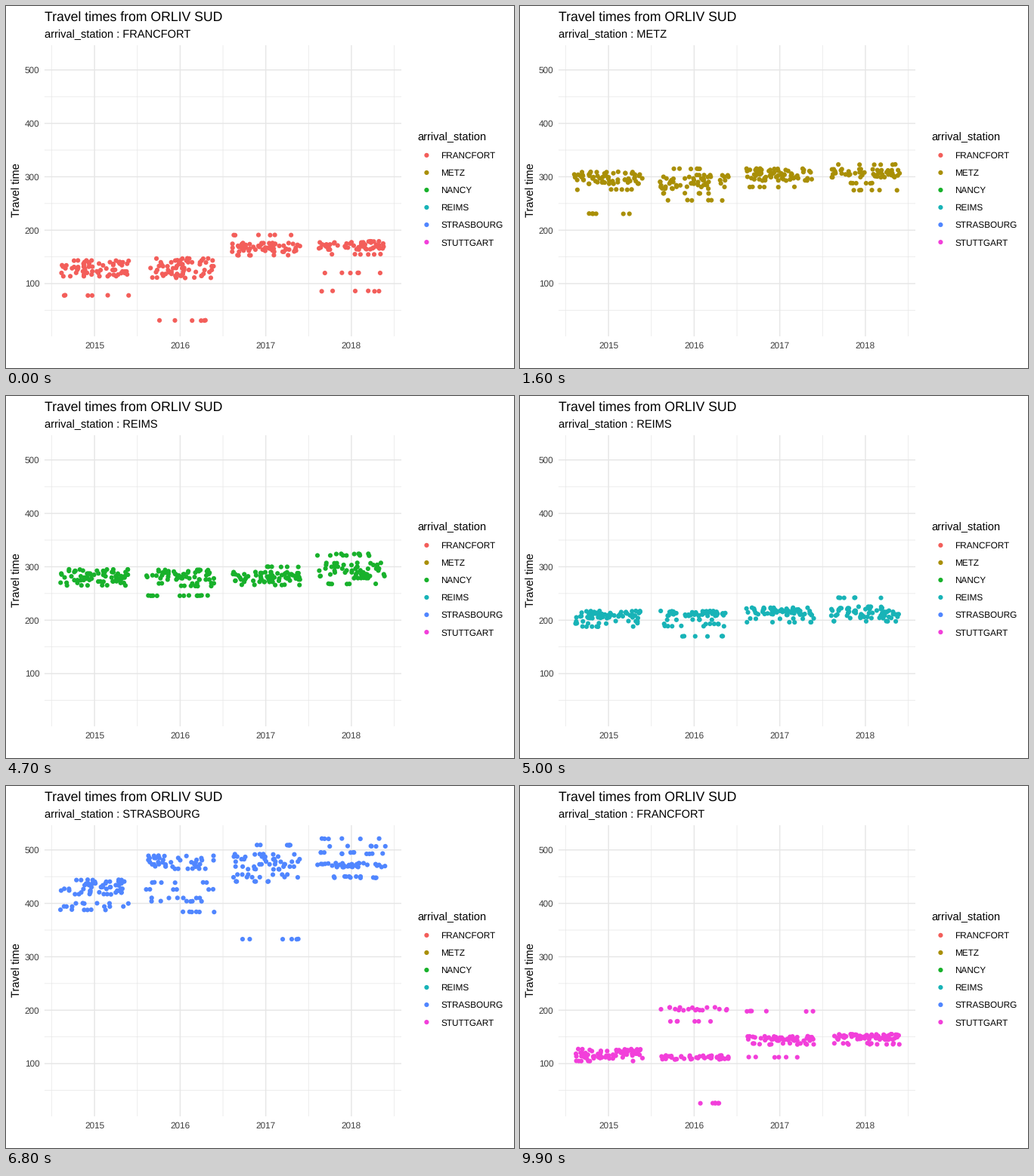
A matplotlib script that plays this animation: 672x480 px, repeating every 10000 ms.

```python
import numpy as np
import matplotlib
import matplotlib.pyplot as plt
from matplotlib.animation import FuncAnimation

matplotlib.rcParams["font.family"] = "Liberation Sans"
matplotlib.rcParams["text.hinting"] = "none"

WIDTH, HEIGHT, DPI = 672, 480, 96
LEFT, RIGHT, TOP, BOTTOM = 50.9, 523, 52, 438
GRID, TICK = "#E6E6E6", "#404040"
DOT_AREA = 21.3
MONTHS, REPEATS = 12, 6  # each monthly value appears as jittered copies
FRAMES = 100
STARTS = [0, 16, 33, 50, 67, 84]
TITLE_LEAD = 3  # the subtitle switches before the points do

rng = np.random.default_rng(15)


def year_x(year):
    return 117.1 + (year - 2015) * 113.27


def value_y(value):
    return 368.1 - (value - 100) * 0.7083


def jittered_years(*years):
    """Each year is (band low, band high, values outside the band...)."""
    clouds = []
    for year, (low, high, *strays) in enumerate(years, 2015):
        band = np.linspace(low, high, MONTHS - len(strays))
        values = np.repeat(np.append(band, strays), REPEATS)
        xs = year_x(year + rng.uniform(-0.4, 0.4, len(values)))
        ys = value_y(values + rng.uniform(-0.4, 0.4, len(values)))
        clouds.append(np.column_stack([xs, ys]))
    return np.vstack(clouds)


stations = [
    ("FRANCFORT", "#F35E5A", jittered_years(
        (114, 143, 78), (111, 147, 31),
        (160, 176, 191, 153), (164, 179, 155, 120, 86))),
    ("METZ", "#A98F06", jittered_years(
        (287, 309, 276, 231), (278, 303, 315, 269, 256),
        (293, 315, 281), (299, 314, 323, 288, 275))),
    ("NANCY", "#18B12B", jittered_years(
        (270, 295, 265), (276, 294, 269, 264, 246, 246),
        (272, 290, 300, 266), (279, 307, 324, 321, 268))),
    ("REIMS", "#18B3B7", jittered_years(
        (204, 217, 198, 194, 188), (208, 217, 201, 193, 189, 170),
        (210, 223, 203, 196), (204, 225, 242, 198))),
    ("STRASBOURG", "#5086FF", jittered_years(
        (417, 444, 400, 394, 388), (465, 489, 439, 426, 410, 404, 384),
        (464, 492, 509, 454, 449, 441, 333),
        (468, 475, 521, 507, 495, 493, 450, 448))),
    ("STUTTGART", "#F23FDA", jittered_years(
        (110, 127, 105), (108, 115, 205, 202, 200, 179, 26),
        (143, 151, 198, 138, 136, 112), (145, 155, 138, 136))),
]

fig = plt.figure(figsize=(WIDTH / DPI, HEIGHT / DPI), dpi=DPI, facecolor="white")
ax = fig.add_axes([0, 0, 1, 1])
ax.set_xlim(0, WIDTH)
ax.set_ylim(HEIGHT, 0)
ax.axis("off")


def label(x, y, text, size=11, color="black", **style):
    return ax.text(x, y, text, fontsize=size, color=color, va="baseline", **style)


def dot_cloud(points, colors):
    # One size per dot keeps the centres at fractions of a pixel.
    return ax.scatter(*np.transpose(points), s=np.full(len(points), DOT_AREA),
                      c=colors, linewidths=0, snap=False, zorder=3)


def grid_line(xs, ys, width):
    ax.plot(xs, ys, color=GRID, lw=width, snap=False,
            solid_capstyle="butt", zorder=1)


def vertical(year, width):
    grid_line([year_x(year)] * 2, [TOP, BOTTOM], width)


def horizontal(value, width):
    grid_line([LEFT, RIGHT], [value_y(value)] * 2, width)


for year in np.arange(2014.5, 2019):
    vertical(year, 0.53)
for value in range(50, 500, 100):
    horizontal(value, 0.53)
for year in range(2015, 2019):
    vertical(year, 1.07)
    label(year_x(year), 453.4, str(year), 8.8, TICK, ha="center")
for value in range(100, 600, 100):
    horizontal(value, 1.07)
    label(44.3, value_y(value) + 4.2, str(value), 8.8, TICK, ha="right")

label(LEFT, 20, "Travel times from ORLIV SUD", 13.2)
subtitle = label(LEFT, 42, "")
label(18.8, 244.5, "Travel time", rotation=90, rotation_mode="anchor", ha="center")

names, colors, clouds = zip(*stations)
legend_ys = 197.9 + 23.04 * np.arange(len(stations))
label(544.8, 178, "arrival_station")
dot_cloud([(556.4, y) for y in legend_ys], colors)
for name, y in zip(names, legend_ys):
    label(575, y + 4.3, name, 8.8)

dots = dot_cloud(clouds[0], colors[0])


def index_at(frame):
    return np.searchsorted(STARTS, frame % FRAMES, side="right") - 1


def draw(frame):
    index = index_at(frame)
    dots.set_offsets(clouds[index])
    dots.set_sizes(np.full(len(clouds[index]), DOT_AREA), fig.dpi)
    dots.set_facecolor(colors[index])
    subtitle.set_text(f"arrival_station : {names[index_at(frame + TITLE_LEAD)]}")
    return dots, subtitle


def reset():
    return draw(0)


anim = FuncAnimation(fig, draw, frames=FRAMES, init_func=reset,
                     interval=100, repeat=True, repeat_delay=0)
plt.show()
```
